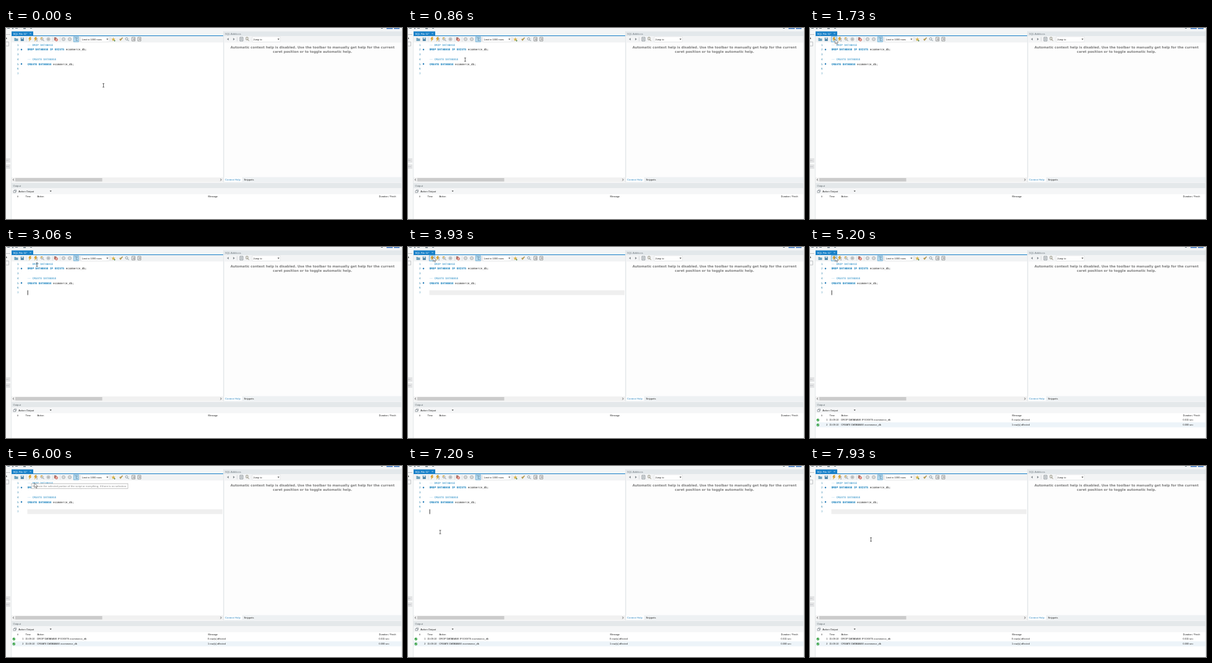
Write an HTML page that moves like this. It is 640 px wide and 308 px high and loops after 8 s.

```html
<!DOCTYPE html>
<html lang="en">
<head>
<meta charset="utf-8">
<title>SQL editor</title>
<style>
html, body { margin: 0; width: 100%; height: 100%; overflow: hidden; background: #fff; }
svg { display: block; width: 100vw; height: 100vh; }
text { white-space: pre; font: 3.9px "Liberation Sans", Arial, sans-serif; fill: #222; }
.ui { font-size: 4.1px; }
.code { font: 4.3px "DejaVu Sans Mono", monospace; }
.kw { fill: #0878b8; font-weight: bold; }
.comment { fill: #2c8fc6; }
.num { fill: #3085ae; text-anchor: end; }
.help { font: bold 5.33px "DejaVu Sans", sans-serif; fill: #7d7d7d; text-anchor: middle; }
.line { fill: none; stroke-width: .8; }
</style>
</head>
<body>
<svg viewBox="0 0 640 308" preserveAspectRatio="none">
  <rect width="640" height="308" fill="#fdfdfd"/>

  <!-- window frame -->
  <rect width="640" height="13" fill="#f3f5f6"/>
  <g fill="#70808c">
    <path d="M2 0h4v1h-4zM10 0h2v1.500h-2zM15 0h4v1h-4zM28 0h4v1.500h-4zM39 0h3v1h-3z"/>
    <path d="M606 0h3v1h-3z"/>
    <path d="M615 0h10v1.500h-10zM627 0h9v1.500h-9z" fill="#3d78c5"/>
  </g>
  <rect y="4" width="8" height="304" fill="#f7f8f8"/>
  <path d="M0 10.500H7M0 22.500H4.500V29H0" class="line" stroke="#b5b9bc"/>
  <path d="M0 15l2 2-2 1z" fill="#555"/>
  <path d="M0 210h7v7h-7zM0 220h7v7h-7z" fill="#e3e4e5"/>
  <path d="M0 213.500h4M0 223.500h5" class="line" stroke="#c4c6c8"/>
  <path d="M8.500 13V308" class="line" stroke="#dfe2e4"/>

  <!-- editor tab and toolbar -->
  <rect x="9" y="5.500" width="35" height="7.500" fill="#1880c8"/>
  <rect x="9" y="12" width="342" height="1" fill="#1880c8"/>
  <text class="ui" x="11.500" y="10.500" style="fill:#fff">SQL File 11*</text>
  <path d="M38.500 8l2 2m0-2l-2 2" class="line" stroke="#d6eaf8" style="stroke-width:.5"/>
  <rect x="9" y="13" width="342" height="10.500" fill="#f1f3f4"/>
  <rect id="hover" x="34.500" y="13.800" width="9" height="8.800" fill="#cde6f7" stroke="#4da3d9" stroke-width=".7"/>
  <g id="icons"></g>
  <rect x="121" y="14" width="45.500" height="8.500" fill="#fff" stroke="#d5d8da" stroke-width=".5"/>
  <text x="122.800" y="19.700" style="font-size:3.95px">Limit to 1000 rows</text>
  <path d="M162.300 17.300h3l-1.500 2z" fill="#444"/>

  <!-- editor -->
  <rect x="9" y="23.500" width="342" height="217.500" fill="#fff"/>
  <rect id="row" x="34.500" y="69.800" width="315.500" height="7.700" fill="#efefef"/>
  <g id="code"></g>
  <rect id="caret" x="34.700" y="69.800" width=".9" height="7.700" fill="#222"/>
  <rect x="9" y="241" width="342" height="7.500" fill="#f1f1f1"/>
  <rect x="15" y="242" width="140.500" height="5.500" fill="#cbcbcb"/>
  <path d="M12.800 243l-1.500 1.700 1.500 1.700M346.500 243l1.500 1.700-1.500 1.700" class="line" stroke="#444"/>

  <!-- additions pane -->
  <rect x="351" y="5" width="1.500" height="244" fill="#e4e8ea"/>
  <rect x="352" y="5.500" width="287" height="7.500" fill="#e3e8eb"/>
  <text class="ui" x="354" y="10.800" style="fill:#717a80">SQL Additions</text>
  <rect x="352.500" y="13" width="286.500" height="10.500" fill="#f3f4f5"/>
  <path d="M360 16l-3 2 3 2zM367 16l3 2-3 2z" fill="#8b9297"/>
  <path d="M373.500 14.500v7" class="line" stroke="#d0d4d6"/>
  <path d="M378 15h5v6h-5zM379 17h3M379 19h3" class="line" stroke="#7d878e"/>
  <path d="M388 15h3v4h-3zM390 18l3 3" class="line" stroke="#8a8673"/>
  <rect x="398" y="14" width="45" height="8.500" fill="#fff" stroke="#d5d8da" stroke-width=".5"/>
  <text x="399.500" y="19.700" style="font-size:4px">Jump to</text>
  <path d="M438.800 17.300h3l-1.500 2z" fill="#444"/>
  <text class="help" x="495.300" y="32.700">Automatic context help is disabled. Use the toolbar to manually get help for the current</text>
  <text class="help" x="495.300" y="40.200">caret position or to toggle automatic help.</text>
  <rect x="352.500" y="240.500" width="287" height="8.500" fill="#eef1f3"/>
  <rect x="352.500" y="240.500" width="29" height="7.500" fill="#fff"/>
  <text x="354" y="246" style="fill:#2380bd;font-size:4.3px">Context Help</text>
  <text class="ui" x="384.500" y="246">Snippets</text>
  <path d="M639.300 4V308" class="line" stroke="#dde1e3"/>

  <!-- output pane -->
  <rect x="9" y="249" width="630" height="1" fill="#f3f4f5"/>
  <rect x="9" y="250" width="630" height="8.500" fill="#e4e8ea"/>
  <text class="ui" x="11.500" y="256" style="fill:#5d666b">Output</text>
  <rect x="9" y="258.500" width="630" height="9.500" fill="#f5f6f7"/>
  <path d="M12 262.500h3.500v3h-3.500zM13.500 262v-1h3v3h-1" class="line" stroke="#707a80" style="stroke-width:.6"/>
  <text class="ui" x="20.300" y="264.900">Action Output</text>
  <path d="M70.700 262.300h3l-1.500 2z" fill="#444"/>
  <rect x="9" y="268" width="630" height="40" fill="#fff"/>
  <g id="headings"></g>
  <g id="results"></g>

  <g id="tooltip">
    <rect x="41" y="28.500" width="156" height="8" fill="#fcfcfc" stroke="#a5a5a5" stroke-width=".6"/>
    <text x="43.300" y="33.900" style="fill:#8a8a8a;font-size:4.4px">Execute the selected portion of the script or everything, if there is no selection</text>
  </g>
  <path id="arrow" d="M0 0V7.200L1.700 5.700 2.900 8.400 4 7.900 2.900 5.300H5.200Z" fill="#fff" stroke="#222" stroke-width=".5"/>
  <path id="beam" d="M-1.500-2.800H1.500M0-2.800V2.800M-1.500 2.800H1.500" class="line" stroke="#333" style="stroke-width:.7"/>
</svg>
<script>
const LOOP = 8000;
const $ = id => document.getElementById(id);
const label = (x, y, s, cls = '') => `<text class="${cls}" x="${x}" y="${y}">${s}</text>`;
const stroke = (d, color, width = .8) => `<path d="${d}" fill="none" stroke="${color}" stroke-width="${width}"/>`;
const fill = (d, color) => `<path d="${d}" fill="${color}"/>`;
const ring = (x, y, r, color, inside = 'none') =>
  `<circle cx="${x}" cy="${y}" r="${r}" fill="${inside}" stroke="${color}" stroke-width=".8"/>`;
const bolt = x => fill(`M${x} 14.500h3l-1.500 2.500h2l-4.500 5 1-3.800h-1.800z`, '#d9a233');
const lens = (x, color) => ring(x - .5, 17.500, 1.9, color) + stroke(`M${x + 1} 19l2 2`, color, 1);

$('icons').innerHTML = [
  fill('M13.500 16h2l1 1h3v4h-6z', '#6fa3bd'),
  fill('M23.800 15.500h5v5.500h-5z', '#4f86a8') + fill('M25 15.500h2.500v2h-2.500z', '#e5eff5'),
  bolt(38), bolt(47), stroke('M50 17v4M49 17h2M49 21h2', '#666', .5),
  lens(58.500, '#7d8a90'), fill('M56 15l3 0-2 4z', '#d9b55f'),
  ring(68.500, 18, 2.6, '#b2b6b8', '#d9dbdc'), fill('M67.300 16.800h2.400v2.400h-2.400z', '#a9adaf'),
  fill('M77.800 15h3.500v5h-3.500z', '#a87a72'), ring(81.500, 19, 2, '#c64b3f', '#eab3aa'),
  ring(93, 18, 2.6, '#a9aeb1', '#d5d8d9'), ring(103, 18, 2.6, '#a9aeb1', '#d5d8d9'),
  fill('M109 13.800h8.500v8.800h-8.500z', '#b9dcf1'), stroke('M109.300 14h8v8.300h-8z', '#579dc7', .6),
  stroke('M111 16h4.500l-2.200 2.300v2.400M114 20h2', '#557f99'),
  fill('M173.500 15l.9 2.200 2.300.2-1.800 1.500.6 2.300-2-1.200-2 1.200.6-2.300-1.800-1.500 2.300-.2z', '#d8b44e'),
  stroke('M175.500 19v3M174 20.500h3', '#5b8d54', .7),
  fill('M183 18l3-1 2-2 1 1-2 2.500-2 2.500z', '#b49a56'),
  lens(195.500, '#7b8b94'),
  stroke('M203.500 15h5v6h-5zM206 16.500v3.500M207 16.500v3.500', '#777', .7),
  stroke('M213 15h5v6h-5zM214.500 17h2v2h-2', '#777', .7),
  ...[33, 75.500, 87.500, 119, 169].map(x => stroke(`M${x} 14.500v7.500`, '#d3d6d8', .6))
].join('');

const kw = s => `<tspan class="kw">${s}</tspan>`;
const comment = s => `<tspan class="comment">${s}</tspan>`;
const lines = [
  comment('-- DROP DATABASE'), kw('DROP DATABASE IF EXISTS') + ' ecommerce_db;', '',
  comment('-- CREATE DATABASE'), kw('CREATE DATABASE') + ' ecommerce_db;', '', ''
];
$('code').innerHTML = lines.map((s, i) => {
  const y = 28.700 + i * 7.75;
  const dot = s.includes('kw') ? `<circle cx="25" cy="${y - 1.6}" r="1.25" fill="#2a7fb8"/>` : '';
  return label(20.500, y, i + 1, 'code num') + dot + label(34.700, y, s, 'code');
}).join('');

$('headings').innerHTML =
  [[18, '#'], [31.500, 'Time'], [50.500, 'Action'], [326.500, 'Message'], [602.700, 'Duration / Fetch']]
    .map(([x, s]) => label(x, 273, s)).join('');

$('results').innerHTML = [
  ['DROP DATABASE IF EXISTS ecommerce_db', '0 row(s) affected', '0.015 sec'],
  ['CREATE DATABASE ecommerce_db', '1 row(s) affected', '0.000 sec']
].map(([action, message, duration], i) => {
  const y = 278.700 + i * 8;
  return (i ? `<rect x="9" y="${y - 4}" width="630" height="8" fill="#edf4f9"/>` : '') +
    `<circle cx="12.800" cy="${y + .3}" r="2.3" fill="#35a043"/>` +
    stroke(`M11.600 ${y + .3}l1 1 1.500-2`, '#fff', .6) +
    label(26.300, y + 1.4, i + 1) + label(31.200, y + 1.4, '15:09:10') +
    label(50.300, y + 1.4, action) + label(326, y + 1.4, message) + label(602.500, y + 1.4, duration);
}).join('');

// Pointer stops: time, x, y
const stops = [
  [0, 157.500, 92.500], [350, 157.500, 92.500], [1300, 40.500, 18], [2300, 40.500, 18],
  [2900, 50, 28.500], [3300, 50, 28.500], [3900, 40.500, 16], [5500, 40.500, 16],
  [5950, 46, 27.500], [6150, 46, 27.500], [6900, 52, 106.500], [7250, 52, 106.500],
  [7850, 98.500, 118.500], [LOOP, 98.500, 118.500]
];

function pointerAt(t) {
  const i = stops.findIndex(s => s[0] > t);
  const [t0, x0, y0] = stops[i - 1], [t1, x1, y1] = stops[i];
  const p = (t - t0) / (t1 - t0), e = p * p * (3 - 2 * p);
  return [x0 + (x1 - x0) * e, y0 + (y1 - y0) * e];
}

const show = (id, on) => $(id).setAttribute('visibility', on ? 'visible' : 'hidden');

function draw(t) {
  const [x, y] = pointerAt(t);
  const tip = t >= 5300 && t < 6150;
  const beam = y > 23.500 && !tip;
  const focused = t >= 1830;
  const caretOn = (t - 1830) % 1060 < 530;
  show('arrow', !beam);
  show('beam', beam);
  $(beam ? 'beam' : 'arrow').setAttribute('transform', `translate(${x} ${y})`);
  show('hover', y < 23 && x < 44);
  show('tooltip', tip);
  show('caret', focused && caretOn);
  show('row', focused && !caretOn);
  show('results', t >= 4860);
}

function frame() {
  draw(performance.now() % LOOP);
  requestAnimationFrame(frame);
}
frame();
</script>
</body>
</html>
```
